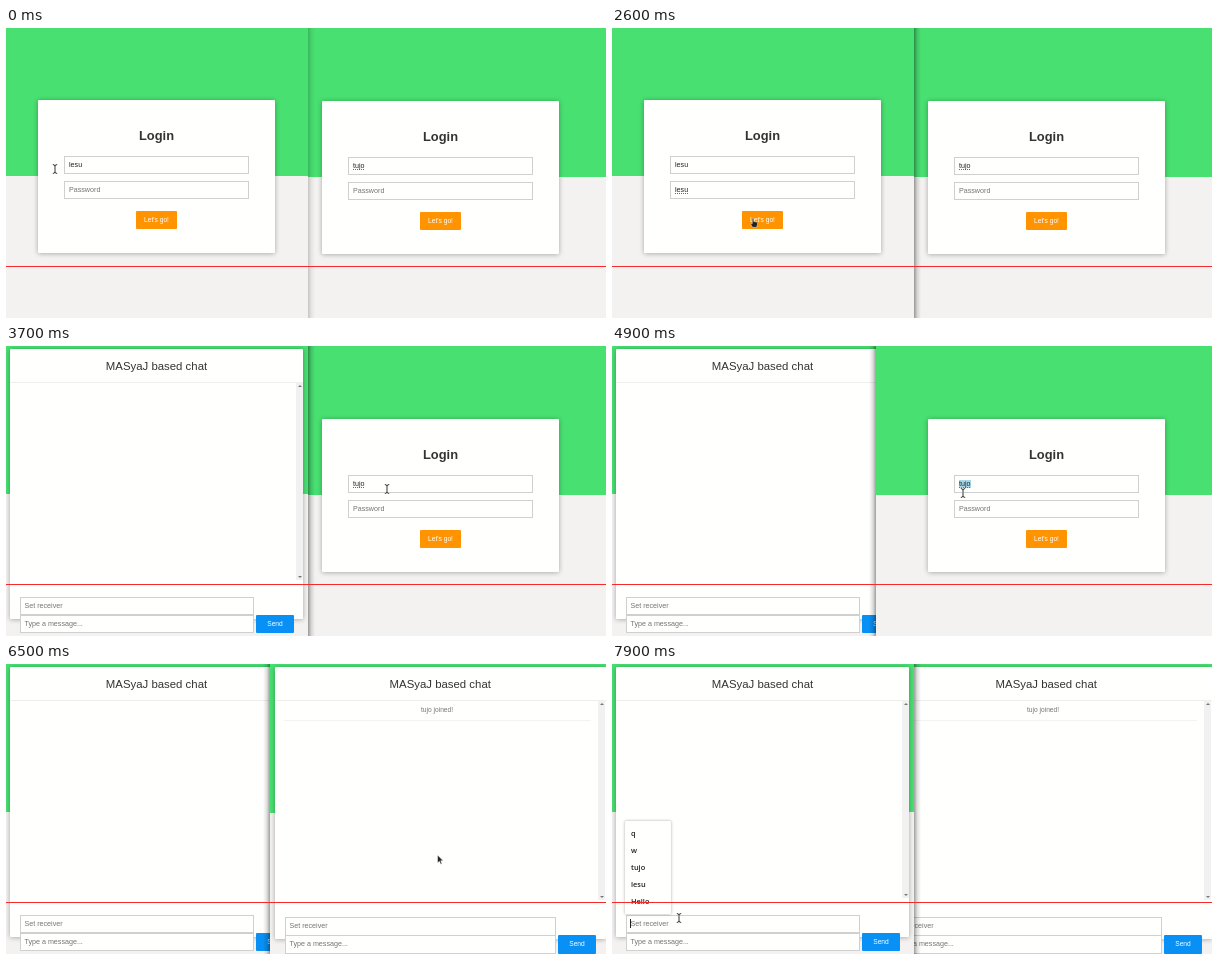
Animation, 600 px wide and 290 px high, one loop 8 s. Source, as an HTML page:

```html
<!DOCTYPE html>
<html lang="en">
<head>
<meta charset="utf-8">
<title>Two chat windows</title>
<style>
  html, body { margin: 0; width: 100%; height: 100%; overflow: hidden; }
  #stage { position: relative; width: 600px; height: 290px; overflow: hidden; background: #f3f2f1;
    font-family: "Liberation Sans", Arial, sans-serif; color: #333; }
  #stage div { position: absolute; box-sizing: border-box; white-space: nowrap; }
  .view { overflow: hidden; background: #f3f2f1; }
  .green { background: #48e071; }
  .panel { background: #fffffe; border-radius: 1px; box-shadow: 0 .5px 5px rgba(0,0,0,.32); }
  .h1 { font: bold 12.9px/16px "Liberation Sans", Arial, sans-serif; text-align: center; }
  .h2 { font-size: 11.4px; line-height: 16px; text-align: center; }
  .field { border: 1px solid #d0d0d0; background: #fffffe; padding-left: 4px; font-size: 7.15px; line-height: 16px; color: #222; }
  .hint { color: #757575; }
  .button { border-radius: 1px; color: #fff; font-size: 6.65px; line-height: 18px; text-align: center; }
  .rule { background: #eee; height: 1px; }
  .event { font-size: 6.65px; line-height: 10px; text-align: center; color: #777; }
  .bar { background: #f1f1f1; }
  .tick { border: solid transparent; border-width: 2px; width: 0; height: 0; }
  .caret { background: #222; width: 1px; height: 9px; }
  .menu { background: #fffffe; border-radius: 1px; box-shadow: 0 0 3px rgba(0,0,0,.35); color: #222; }
  .item { font: 600 7.4px/12px "Open Sans", "Noto Sans", sans-serif; }
  .misspelt { text-decoration: underline dotted #c8433a 1px; text-underline-offset: 1px; }
  .selected { background: #a6d8ea; }
  #line { left: 0; top: 238px; width: 600px; height: 1px; background: #f52a2a; z-index: 5; }
  #pointer { position: absolute; left: 0; top: 0; width: 1px; height: 1px; overflow: visible; z-index: 6; }
</style>
</head>
<body>
<div id="stage">
  <div id="line"></div>
  <svg id="pointer">
    <g id="beam" fill="none">
      <path d="M-2.2-4.4Q0-4.4 0-3Q0-4.4 2.2-4.4M0-3V3M-2.2 4.4Q0 4.4 0 3Q0 4.4 2.2 4.4" stroke="#fff" stroke-width="2" opacity=".6"/>
      <path d="M-2.2-4.4Q0-4.4 0-3Q0-4.4 2.2-4.4M0-3V3M-2.2 4.4Q0 4.4 0 3Q0 4.4 2.2 4.4" stroke="#333" stroke-width="1"/>
    </g>
    <path id="arrow" d="M0 0V8L1.9 6.3L3.2 9.2L4.5 8.6L3.2 5.8H5.7Z" fill="#222" stroke="#fff" stroke-width=".5"/>
    <path id="hand" d="M-.7 0Q0-.7.7 0V3L4 3.6Q4.6 4 4.4 6L3.6 8.8H-.4L-2.3 5.5Q-2.2 4.5-.7 5.3Z" fill="#222" stroke="#fff" stroke-width=".4"/>
  </svg>
</div>
<script>
const LOOP = 8000, STEP = 100;
const LEFT_USER = "lesu", RIGHT_USER = "tujo";
const $ = id => document.getElementById(id);
const stage = $("stage");

function box(parent, cls, x, y, w, h, text = "") {
  const el = document.createElement("div");
  el.className = cls;
  Object.assign(el.style, { left: x + "px", top: y + "px" });
  if (w) el.style.width = w + "px";
  if (h) el.style.height = h + "px";
  el.textContent = text;
  return parent.appendChild(el);
}

function show(el, on) { el.style.visibility = on ? "visible" : "hidden"; }

// A browser window with a drop shadow along its inner edge.
function makeWindow(x, w, greenH, shadowX, shadowDir) {
  const root = box(stage, "", x, 0, w, 290);
  const shadow = box(root, "", shadowX, 0, 7, 290);
  shadow.style.background = `linear-gradient(to ${shadowDir}, rgba(0,0,0,.38), rgba(0,0,0,.13) 45%, transparent)`;
  const view = box(root, "view", 0, 0, w, 290);
  box(view, "green", 0, 0, w, greenH);
  return { root, shadow, view };
}

function makeLogin(parent, x, y) {
  const card = box(parent, "panel", x, y, 237, 152.5);
  box(card, "h1", 0, 28, 237, 16, "Login");
  const name = box(card, "field", 26, 55.5, 185, 18);
  const pass = box(card, "field", 26, 80.5, 185, 18);
  const button = box(card, "button", 98, 110.5, 41, 18.5, "Let's go!");
  button.style.background = "#ff9300";
  const caret = box(card, "caret", 31, 60, 1, 9);
  return { card, name, pass, caret };
}

function makeChat(parent, x, w, h, formY, fieldW, bar) {
  const page = box(parent, "panel", x, 3, w, h);
  box(page, "h2", 0, 8.5, bar.title, 16, "MASyaJ based chat");
  box(page, "rule", 0, 32.5, w, 1);
  box(page, "bar", bar.x, 33, 7, bar.h);
  box(page, "tick", bar.x + 1.5, 34).style.borderBottomColor = "#777";
  box(page, "tick", bar.x + 1.5, 33 + bar.h - 4).style.borderTopColor = "#777";
  box(page, "field hint", 9.5, formY, fieldW, 18.5, "Set receiver");
  box(page, "field hint", 9.5, formY + 18, fieldW, 18.5, "Type a message...");
  box(page, "button", 9.5 + fieldW + 2.5, formY + 18, 38, 18.5, "Send").style.background = "#0890f4";
  return page;
}

function setField(field, text, cls = "") {
  field.classList.toggle("hint", !text);
  field.innerHTML = `<span class="${cls}"></span>`;
  field.firstChild.textContent = text || "Password";
}

function setCaret(caret, x, y) {
  show(caret, x !== null);
  if (x !== null) { caret.style.left = x + "px"; caret.style.top = y + "px"; }
}

const left = makeWindow(0, 302, 148, 302, "right");
const right = makeWindow(264, 336, 149, -7, "left");
const loginL = makeLogin(left.view, 32, 72);
const loginR = makeLogin(right.view, 52, 73);
const chatL = makeChat(left.view, 4, 293, 270, 247.5, 234, { x: 286, h: 198, title: 293 });
const chatR = makeChat(right.view, 5, 330.5, 272, 250, 271, { x: 323, h: 200, title: 330.5 });
box(chatR, "event", 0, 38, 324, 10, RIGHT_USER + " joined!");
box(chatR, "rule", 9, 53, 307, 1).style.background = "#f3f3f3";

const chatCaret = box(chatL, "caret", 14, 252, 1, 9);
const menu = box(left.view, "menu", 13, 157, 46, 93);
["q", "w", RIGHT_USER, LEFT_USER, "Hello"].forEach((word, i) =>
  box(menu, "item", 6, 6 + i * 17.1, 0, 12, word));

// time, x, y
const path = [
  [0, 49, 141], [800, 75, 141], [900, 75, 141], [1300, 78, 160], [1400, 78, 160], [1500, 79, 161],
  [2200, 79, 161], [2600, 141, 190.5], [3200, 141, 190.5], [3700, 381, 143], [3800, 382, 142],
  [4100, 357, 140], [4500, 357, 140], [4800, 351, 144], [4900, 351, 147], [5100, 360, 163],
  [5200, 360, 163], [5500, 364, 165], [5800, 364, 165], [6300, 431.5, 191], [6800, 431.5, 191],
  [7000, 385, 172], [7100, 315, 168], [7200, 235, 184], [7400, 95, 246], [7500, 68, 258],
  [7600, 68, 258], [7800, 67, 254]
];
const kinds = [[0, "beam"], [2400, "hand"], [2700, "arrow"], [3600, "beam"], [6000, "arrow"],
  [6200, "hand"], [6500, "arrow"], [7500, "beam"]];

function pointAt(t) {
  const i = path.findIndex(p => p[0] > t);
  if (i < 0) return path[path.length - 1].slice(1);
  const [a, b] = [path[i - 1], path[i]];
  const u = (t - a[0]) / (b[0] - a[0]);
  return [1, 2].map(k => a[k] + (b[k] - a[k]) * u);
}

function render(t) {
  const rightOnTop = t >= 4200 && t < 7700;
  left.root.style.zIndex = rightOnTop ? 1 : 2;
  right.root.style.zIndex = rightOnTop ? 2 : 1;
  left.shadow.style.opacity = t < 500 ? 0.5 : 1;

  // Left login
  const typed = LEFT_USER.slice(0, Math.max(0, (t - 1800) / STEP));
  setField(loginL.name, LEFT_USER);
  setField(loginL.pass, typed, typed === LEFT_USER ? "misspelt" : "");
  if (t >= 800 && t < 1500) setCaret(loginL.caret, 44, 60);
  else if (t >= 1500 && t < 2500) setCaret(loginL.caret, 31 + typed.length * 3.3, 85);
  else setCaret(loginL.caret, null);
  show(loginL.card, t < 2700);
  if (t >= 2700) show(loginL.caret, false);
  show(chatL, t >= 2700);

  // Right login
  const picked = t >= 4700 && t < 5300;
  setField(loginR.name, RIGHT_USER, picked ? "misspelt selected" : "misspelt");
  setField(loginR.pass, t >= 5800 ? RIGHT_USER : "", t >= 5800 ? "misspelt" : "");
  if (t >= 5300 && t < 6200) setCaret(loginR.caret, t < 5800 ? 31 : 43, 85);
  else setCaret(loginR.caret, null);
  show(loginR.card, t < 6500);
  show(chatR, t >= 6500);

  show(chatCaret, t >= 7700);
  show(menu, t >= 7900);

  const [x, y] = pointAt(t);
  const kind = kinds.filter(k => k[0] <= t).pop()[1];
  for (const id of ["beam", "arrow", "hand"]) {
    $(id).style.display = id === kind ? "" : "none";
    $(id).setAttribute("transform", `translate(${x} ${y})`);
  }
}

let last = -1;
function tick() {
  const t = Math.floor((performance.now() % LOOP) / STEP) * STEP;
  if (t !== last) render(last = t);
  requestAnimationFrame(tick);
}
tick();
</script>
</body>
</html>
```
